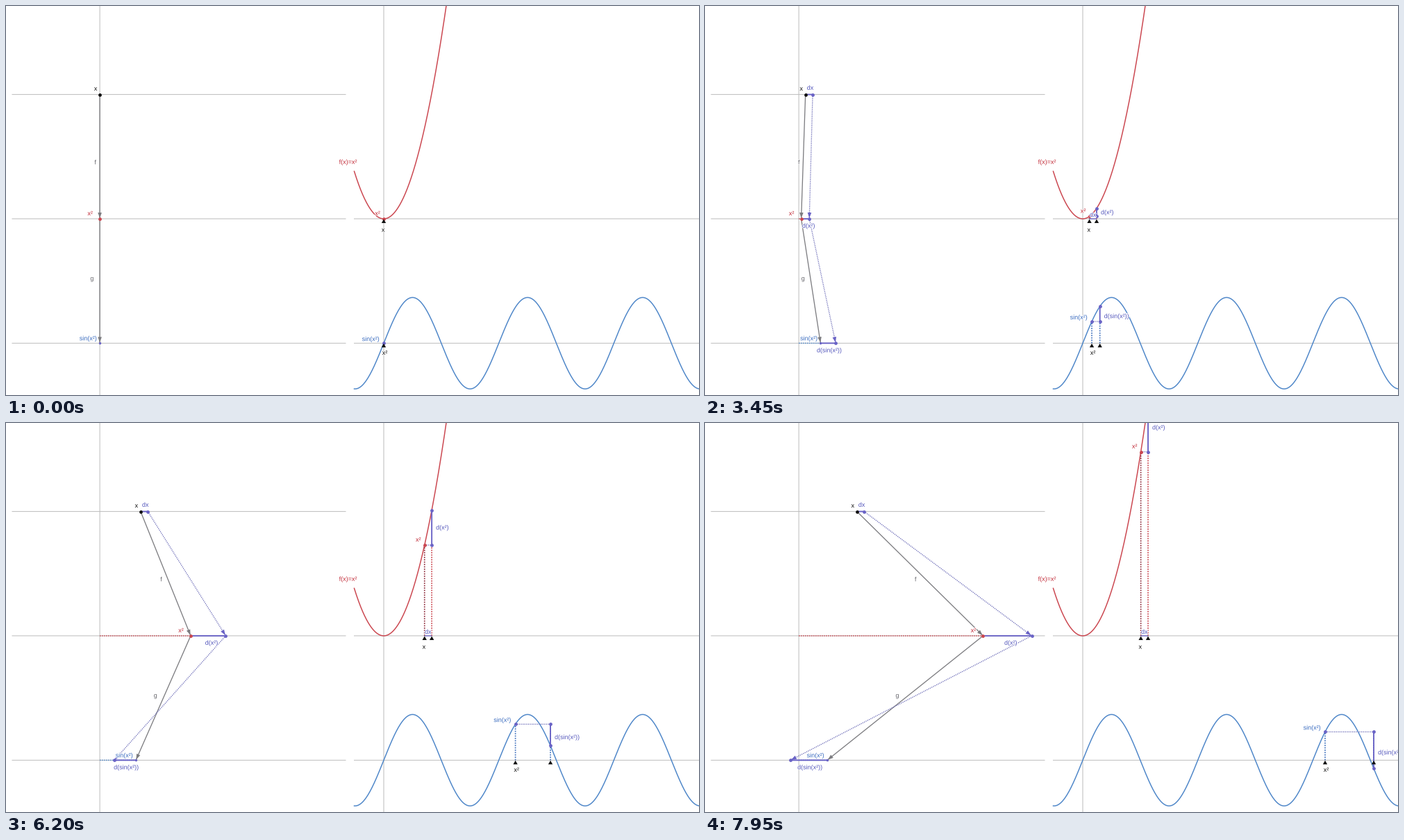
These frames come from a looping animation (998 by 561 pixels, 8 s). A matplotlib script:

```python
import numpy as np
import matplotlib.pyplot as plt
import matplotlib.patheffects as pe
from matplotlib.animation import FuncAnimation

W, H, DPI = 998, 561, 64
PX = 72 / DPI                 # points per pixel
STEP, LOOP = 50, 8000

U = 26.37                     # pixels per unit
AMP = 2.5 * U
LX, RX = 135.1, 544           # vertical axes
TOP, MID, LOW = 127.6, 306.9, 486.3

BLACK, GRAY, AXIS = "#111111", "#7c7c80", "#bcbcbc"
RED, MAROON = "#cb4750", "#8e2a3a"
BLUE, DEEP, SLATE = "#4f87c9", "#3d6fbc", "#2e3350"
PURPLE, HAZE, VIOLET = "#6a63c6", "#6c6cb8", "#5558bd"
RED_TEXT, BLUE_TEXT, GRAY_TEXT = "#c22b38", "#3a6cc0", "#66666c"

plt.rcParams["font.family"] = "Liberation Sans"
plt.rcParams["path.snap"] = False     # keep sub-pixel positions
fig = plt.figure(figsize=(W / DPI, H / DPI), dpi=DPI, facecolor="white")
ax = fig.add_axes([0, 0, 1, 1])
ax.set_xlim(0, W)
ax.set_ylim(H, 0)
ax.axis("off")

halo = [pe.withStroke(linewidth=1.6 * PX, foreground="white")]
delta_parts = []              # only shown while dx > 0


def keep(artist, delta):
    if delta:
        delta_parts.append(artist)
    return artist


def line(color, lw, dotted=False, delta=False, z=4):
    art, = ax.plot([], [], color=color, lw=lw * PX, zorder=z,
                   solid_capstyle="butt", dash_capstyle="butt")
    if dotted:
        art.set_linestyle((0, (1, 1)))
    return keep(art, delta)


def dot(color, r=2.4, delta=False):
    art, = ax.plot([], [], "o", color=color, ms=2 * r * PX, mew=0, zorder=7)
    return keep(art, delta)


def label(s, color, ha="center", delta=False):
    art = ax.text(0, 0, s, color=color, size=9 * PX, ha=ha, va="baseline",
                  zorder=9, path_effects=halo, clip_on=True)
    return keep(art, delta)


def poly(color, delta=False, z=8):
    art, = ax.fill([0, 0, 0], [0, 0, 0], color=color, lw=0, zorder=z)
    return keep(art, delta)


def put(art, x0, y0, x1, y1):
    art.set_data([x0, x1], [y0, y1])


def put_dot(art, x, y):
    art.set_data([x], [y])


class Arrow:
    def __init__(self, color, lw, head, dotted=False, delta=False):
        self.shaft = line(color, lw, dotted, delta, 5)
        self.head = poly(head, delta, 6)

    def put(self, x0, y0, x1, y1):
        put(self.shaft, x0, y0, x1, y1)
        p, q = np.array([x0, y0]), np.array([x1, y1])
        d = (q - p) / np.hypot(*(q - p))
        n = np.array([-d[1], d[0]])
        tip = q - d
        back = tip - 8 * d
        self.head.set_xy([tip, back + 2.8 * n, back - 2.8 * n])


def put_tri(art, x, y):
    art.set_xy([(x, y), (x - 3.2, y + 5.6), (x + 3.2, y + 5.6)])


# axes and curves
for y in (TOP, MID, LOW):
    ax.plot([9, 489], [y, y], color=AXIS, lw=PX, zorder=1)
for y in (MID, LOW):
    ax.plot([501.5, W], [y, y], color=AXIS, lw=PX, zorder=1)
for x in (LX, RX):
    ax.plot([x, x], [0, H], color=AXIS, lw=PX, zorder=1)
d = np.linspace(-42.5, 95, 300)
ax.plot(RX + d, MID - d ** 2 / U, color=RED, lw=1.5 * PX, zorder=2)
d = np.linspace(-42.5, W - RX, 900)
ax.plot(RX + d, LOW - AMP * np.sin(d / U), color=BLUE, lw=1.5 * PX, zorder=2)
label("f(x)=x²", RED_TEXT).set_position((492.5, 227.8))

# mapping view
sq_guide = line(RED, 1.5, True, z=3)
sin_guide = line(BLUE, 1.5, True, z=3)
f_arrow = Arrow(GRAY, 1.3, GRAY)
g_arrow = Arrow(GRAY, 1.3, GRAY)
df_arrow = Arrow(HAZE, 1.3, PURPLE, True, True)
dg_arrow = Arrow(HAZE, 1.3, PURPLE, True, True)
bars = [line(PURPLE, 1.9, delta=True) for _ in range(3)]
x_dot, sq_dot, sin_dot = dot(BLACK), dot(RED), dot(PURPLE, 1.7)
ends = [dot(PURPLE, delta=True) for _ in range(3)]
x_lab, sq_lab = label("x", BLACK), label("x²", RED_TEXT)
sin_lab = label("sin(x²)", BLUE_TEXT)
f_lab, g_lab = label("f", GRAY_TEXT), label("g", GRAY_TEXT)
dx_lab = label("dx", VIOLET, delta=True)
dsq_lab = label("d(x²)", VIOLET, delta=True)
dsin_lab = label("d(sin(x²))", VIOLET, delta=True)

# graph of f
f_drop = line(MAROON, 1.7, True, z=3)
f_drop2 = line(RED, 1.7, True, True, 3)
f_run = line(HAZE, 1.3, True, True, 3)
f_base = line(PURPLE, 1.3, delta=True)
f_rise = line(PURPLE, 1.9, delta=True)
f_dot = dot(RED)
f_corner, f_end = dot(PURPLE, delta=True), dot(PURPLE, delta=True)
f_tri, f_tri2 = poly(BLACK), poly(BLACK, True)
fx_lab, fsq_lab = label("x", BLACK), label("x²", RED_TEXT)
fdx_lab = label("dx", VIOLET, delta=True)
fdsq_lab = label("d(x²)", VIOLET, "left", True)

# graph of g
g_drop = line(DEEP, 1.7, True, z=3)
g_drop2 = line(DEEP, 1.7, True, True, 3)
g_run = line(HAZE, 1.3, True, True, 3)
g_rise = line(PURPLE, 1.9, delta=True)
g_dot = dot(PURPLE)
g_corner, g_end = dot(PURPLE, delta=True), dot(PURPLE, delta=True)
g_tri, g_tri2 = poly(BLACK), poly(BLACK, True)
gsq_lab, gsin_lab = label("x²", BLACK), label("sin(x²)", BLUE_TEXT)
gdsin_lab = label("d(sin(x²))", VIOLET, "left", True)


def update(i):
    t = i * STEP
    x = np.interp(t, [2916, 5450, 6900, 7650, 7950],
                  [0, 45.4, 71.2, 79.4, 83.65])
    h = np.interp(t, [1000, 1350, 1910], [0, 4, 10.4])
    x2 = x + h
    s, s2 = x ** 2 / U, x2 ** 2 / U
    m, m2 = x + s, x + s2     # inputs of the sine
    v, v2 = AMP * np.sin(m / U), AMP * np.sin(m2 / U)

    for art in delta_parts:
        art.set_visible(h > 0)

    put(sq_guide, LX, MID, LX + s, MID)
    put(sin_guide, LX, LOW, LX + v, LOW)
    f_arrow.put(LX + x, TOP, LX + s, MID)
    g_arrow.put(LX + s, MID, LX + v, LOW)
    df_arrow.put(LX + x2, TOP, LX + s2, MID)
    dg_arrow.put(LX + s2, MID, LX + v2, LOW)
    rows = zip(bars, (x_dot, sq_dot, sin_dot), ends,
               (x, s, v), (x2, s2, v2), (TOP, MID, LOW))
    for bar, start, end, a, b, y in rows:
        put(bar, LX + a, y, LX + b, y)
        put_dot(start, LX + a, y)
        put_dot(end, LX + b, y)
    x_lab.set_position((LX + x - 6, 122))
    sq_lab.set_position((LX + s - 14, 302))
    sin_lab.set_position((LX + v - 16.8, 482.2))
    f_lab.set_position((LX + (x + s) / 2 - 6.4, 228.3))
    g_lab.set_position((LX + (s + v) / 2 - 11.2, 395.8))
    dx_lab.set_position((LX + (x + x2) / 2 + 1.7, 120.8))
    dsq_lab.set_position((LX + (s + s2) / 2 + 4.8, 319.8))
    dsin_lab.set_position((LX + (v + v2) / 2 + 1.7, 499.4))

    a, b, y, y2 = RX + x, RX + x2, MID - s, MID - s2
    put(f_drop, a, MID, a, y)
    put(f_drop2, b, MID, b, y)
    put(f_run, a, y, b, y)
    put(f_base, a, MID, b, MID)
    put(f_rise, b, y, b, y2)
    put_dot(f_dot, a, y)
    put_dot(f_corner, b, y)
    put_dot(f_end, b, y2)
    put_tri(f_tri, a, MID + 0.5)
    put_tri(f_tri2, b, MID + 0.5)
    fx_lab.set_position((a - 0.8, 325.6))
    fsq_lab.set_position((a - 9, y - 5))
    fdx_lab.set_position(((a + b) / 2, 304))
    fdsq_lab.set_position((b + 6, (y + y2) / 2 + 2.8))

    a, b, y, y2 = RX + m, RX + m2, LOW - v, LOW - v2
    shade = DEEP if v >= 0 else SLATE
    g_drop.set_color(shade)
    g_drop2.set_color(shade)
    put(g_drop, a, LOW, a, y)
    put(g_drop2, b, LOW, b, y)
    put(g_run, a, y, b, y)
    put(g_rise, b, y, b, y2)
    put_dot(g_dot, a, y)
    put_dot(g_corner, b, y)
    put_dot(g_end, b, y2)
    put_tri(g_tri, a, LOW + 0.4)
    put_tri(g_tri2, b, LOW + 0.4)
    gsq_lab.set_position((a + 1.5, 503))
    gsin_lab.set_position((a - 18.8, y - 3.2))
    gdsin_lab.set_position((b + 6, (y + y2) / 2 + 6))
    return []


anim = FuncAnimation(fig, update, frames=LOOP // STEP, interval=STEP,
                     init_func=lambda: update(0), repeat=True, repeat_delay=0)
plt.show()
```
